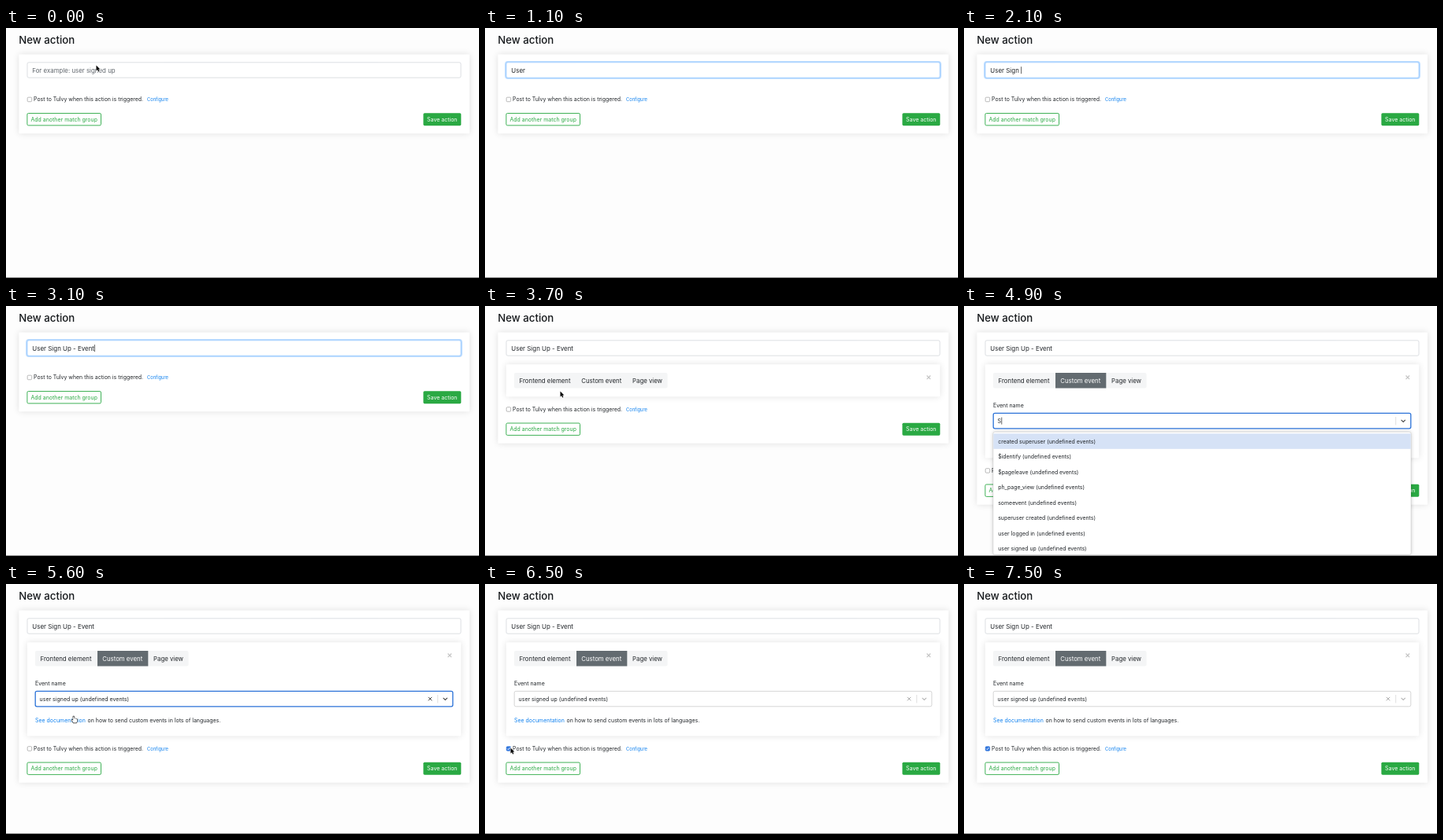
Animation of 600x318 px, one loop 7600 ms. Source, as an HTML page with a canvas:

```html
<!DOCTYPE html>
<html lang="en">
<head>
<meta charset="utf-8">
<title>New action</title>
<style>
html, body { margin: 0; width: 100%; height: 100%; overflow: hidden; background: #fdfdfd; }
canvas { display: block; width: 600px; height: 318px; }
</style>
</head>
<body>
<canvas id="stage"></canvas>
<script>
const W = 600, H = 318, LOOP = 7600, STEP = 100;
const INK = '#212529', GREY = '#62686e', GREEN = '#2aa943', LINK = '#0f80ef', BLUE = '#2b72d8';
const canvas = document.getElementById('stage');
const ctx = canvas.getContext('2d');
const dpr = window.devicePixelRatio || 1;
canvas.width = W * dpr;
canvas.height = H * dpr;

const EVENTS = ['created superuser', '$identify', '$pageleave', 'ph_page_view',
  'someevent', 'superuser created', 'user logged in', 'user signed up']
  .map(name => name + ' (undefined events)');
const CHOICE = EVENTS[7];

// Typing: time, number of letters shown
const TITLE = 'User Sign Up - Event';
const KEYS = [[0, 0], [800, 2], [900, 4], [1100, 5], [1200, 6], [1300, 7], [1700, 8], [1800, 9],
  [2100, 10], [2200, 11], [2300, 12], [2500, 14], [2700, 16], [2800, 17], [2900, 18],
  [3000, 19], [3100, 20]];

// Pointer: time, x, y, shape until the next point
const PATH = [
  [0, 114, 47, 'arrow'], [300, 78, 104, 'arrow'], [500, 30, 58, 'beam'], [900, 30, 58, ''],
  [3300, 32, 60, 'arrow'], [3500, 75, 114, 'hand'], [3700, 95, 108, 'arrow'],
  [3800, 148, 94, 'hand'], [4100, 144, 100, 'arrow'], [4300, 113, 138, 'arrow'],
  [4500, 100, 145, 'arrow'], [4900, 100, 145, ''],
  [5300, 104, 144, 'arrow'], [5600, 85, 168, 'hand'], [5700, 62, 186, 'arrow'],
  [5900, 31, 206, 'arrow'], [6500, 32, 208, 'arrow'], [6700, 50, 231, 'hand'],
  [6800, 84, 214, 'arrow'], [7200, 296, 94, 'arrow'], [7300, 222, 149, 'arrow'],
  [7400, 128, 110, 'arrow'], [7500, 128, 110, '']
];

function last(list, t) {
  let i = 0;
  while (i + 1 < list.length && list[i + 1][0] <= t) i++;
  return i;
}

function text(str, x, y, size = 7, color = INK, weight = 400, align = 'left') {
  ctx.font = `${weight} ${size}px Inter, sans-serif`;
  ctx.textAlign = align;
  ctx.fillStyle = color;
  ctx.fillText(str, x, y);
}

function box(x, y, w, h, r, fill, stroke, line = 0.6) {
  ctx.beginPath();
  ctx.roundRect(x, y, w, h, r);
  if (fill) { ctx.fillStyle = fill; ctx.fill(); }
  if (stroke) { ctx.strokeStyle = stroke; ctx.lineWidth = line; ctx.stroke(); }
}

function panel(x, y, w, h, r = 1, alpha = 0.12, blur = 8) {
  ctx.save();
  ctx.shadowColor = `rgba(0,0,0,${alpha})`;
  ctx.shadowBlur = blur * dpr;
  box(x, y, w, h, r, '#fff');
  ctx.restore();
}

function lines(points, color, width) {
  ctx.beginPath();
  points.forEach(([x, y, start]) => start ? ctx.moveTo(x, y) : ctx.lineTo(x, y));
  ctx.strokeStyle = color;
  ctx.lineWidth = width;
  ctx.stroke();
}

function cross(x, y, r, color, width) {
  lines([[x - r, y - r, 1], [x + r, y + r], [x + r, y - r, 1], [x - r, y + r]], color, width);
}

function caret(x, y) {
  ctx.fillStyle = '#222';
  ctx.fillRect(x, y, 0.7, 9);
}

function titleField(t) {
  const focus = t >= 3600 ? 0 : Math.min(1, Math.max(0, (t - 500) / 150));
  if (focus) box(26.1, 42.9, 551.8, 21.2, 3, null, `rgba(0,123,255,${0.28 * focus})`, 1.9);
  box(27, 43.8, 550, 19.4, 2, '#fff', focus ? '#80bdff' : '#c6cbd1');
  const count = KEYS[last(KEYS, t)][1];
  if (!count) {
    text('For example: user signed up', 33.3, 56.5, 7.88, GREY);
    return;
  }
  const typed = TITLE.slice(0, count);
  text(typed, 33.3, 56.5, 7.95);
  const dark = (t >= 1100 && t < 1200) || (t >= 1500 && t < 1700);
  if (focus && !dark) caret(33.6 + ctx.measureText(typed).width, 49.2);
}

function tabs(t) {
  box(37, 85, 194.5, 19.4, 2, '#f4f5f6');
  const chosen = t >= 3900, focus = chosen && t < 4600;
  if (chosen) {
    if (focus) box(115.4, 84.4, 65.4, 20.6, 1.5, null, 'rgba(108,117,125,.55)', 1.8);
    box(116, 85, 64.3, 19.4, 0, focus ? '#50575b' : '#636b70');
  }
  text('Frontend element', 43.6, 97.7, 7.85);
  text('Custom event', 122.2, 97.7, 7.82, chosen ? '#fff' : INK);
  text('Page view', 187, 97.7, 7.82);
}

function eventField(t) {
  const focus = t >= 4600 && t < 6100, picked = t >= 5100;
  text('Event name', 37, 129.2);
  box(37.2, 136.4, 529.6, 19.4, 2, '#fff', focus ? BLUE : '#c4c4c4', focus ? 1.3 : 0.7);
  lines([[547.7, 141, 1], [547.7, 151.4]], '#ccc', 0.6);
  lines([[554.6, 144.9, 1], [557.2, 147.5], [559.8, 144.9]], focus ? '#444' : '#b5b5b5', 1.1);

  if (picked) {
    text(CHOICE, 42.6, 148.7);
    cross(538, 146.1, 2.2, focus ? '#444' : '#aaa', 1);
  } else if (t >= 4900) {
    const typed = t < 5000 ? 'S' : 'Si';
    text(typed, 42.6, 148.7);
    caret(43 + ctx.measureText(typed).width, 141.6);
  } else {
    text('Select...', 42.6, 148.7, 7.1, '#707070');
    for (let i = 0; i < 3; i++) {
      const glow = 0.55 + 0.45 * Math.sin((t - 4300 - i * 160) / 1000 * 2 * Math.PI + 5.4 + i);
      ctx.fillStyle = `rgba(140,140,140,${Math.max(0.25, glow)})`;
      ctx.beginPath();
      ctx.arc(532 + i * 4.4, 146.2, 0.95, 0, 7);
      ctx.fill();
    }
  }
  text('See documentation', 37, 175.5, 6.98, LINK);
  text('on how to send custom events in lots of languages.', 103.5, 175.5, 6.98);
}

function menu(t) {
  if (t < 4600 || t >= 5100) return;
  const loading = t < 4900;
  const rows = loading ? ['Loading...'] : t < 5000 ? EVENTS : [CHOICE];
  const h = Math.min(156, rows.length * 19.55 + 4);
  panel(37, 160.2, 530, h, 2, 0.22, 5);
  box(37, 160.2, 530, h, 2, null, 'rgba(0,0,0,.16)', 0.6);
  ctx.save();
  ctx.beginPath();
  ctx.rect(37, 160, 530, h);
  ctx.clip();
  if (loading) {
    text('Loading...', 302, 174.5, 7, '#999', 400, 'center');
  } else {
    ctx.fillStyle = '#d6e2f6';
    ctx.fillRect(37.3, 162.3, 529.4, 19.5);
    rows.forEach((row, i) => text(row, 43.2, 174.5 + i * 19.55, 6.95));
  }
  ctx.restore();
}

function footer(y, checked) {
  box(27.2, y - 2.9, 5.5, 5.5, 1.2, checked ? '#2f74dc' : '#fff', checked ? '#2f74dc' : '#8c8c8c', 0.6);
  if (checked) lines([[28.4, y, 1], [29.5, y + 1.2], [31.4, y - 1.5]], '#fff', 0.9);
  text('Post to Tulvy when this action is triggered.', 35, y + 2.3, 6.95);
  text('Configure', 179, y + 2.3, 5.75, LINK);
  const b = y + 17.4;
  box(26.9, b, 93.6, 15.4, 1.6, '#fff', GREEN, 0.9);
  text('Add another match group', 73.7, b + 10.3, 7, GREEN, 400, 'center');
  box(529.4, b - 0.3, 47.9, 16, 1.6, GREEN);
  text('Save action', 553.3, b + 10.3, 7, '#fff', 400, 'center');
}

function shape(points, fill, edge) {
  ctx.beginPath();
  points.forEach(([x, y]) => ctx.lineTo(x, y));
  ctx.closePath();
  ctx.lineJoin = 'round';
  ctx.strokeStyle = edge;
  ctx.lineWidth = 1.2;
  ctx.stroke();
  ctx.fillStyle = fill;
  ctx.fill();
}

function pointer(t) {
  const i = last(PATH, t), [t0, x0, y0, kind] = PATH[i];
  if (!kind) return;
  const [t1, x1, y1] = PATH[i + 1];
  const k = (t - t0) / (t1 - t0);
  ctx.save();
  ctx.translate(x0 + (x1 - x0) * k, y0 + (y1 - y0) * k);
  if (kind === 'arrow') {
    shape([[0.5, 0.5], [0.5, 7.4], [2.1, 5.9], [3.2, 8.5], [4.4, 8], [3.3, 5.5], [5.4, 5.4]], '#000', '#fff');
  } else if (kind === 'hand') {
    shape([[0.2, 0.4], [1.3, 0.4], [1.6, 3], [4.6, 3.6], [5.4, 4.5], [4.9, 7.2], [4.3, 8.6],
      [0.6, 8.6], [-1.6, 5.4], [-1.2, 4.6], [0.2, 5.6]], '#fff', '#222');
  } else {
    lines([[-1.6, -4, 1], [0, -3.4], [1.6, -4], [0, -3.4, 1], [0, 3.4],
      [-1.6, 4, 1], [0, 3.4], [1.6, 4]], '#222', 0.7);
  }
  ctx.restore();
}

function draw(t) {
  ctx.setTransform(dpr, 0, 0, dpr, 0, 0);
  ctx.fillStyle = '#fdfdfd';
  ctx.fillRect(0, 0, W, H);
  text('New action', 16.2, 20.1, 13.25, '#16191c', 500);

  const shift = t < 3600 ? 0 : t < 3900 ? 40.5 : 118.5;
  panel(16.4, 33.5, 571.6, 100.7 + shift);
  titleField(t);
  if (shift) {
    panel(26.9, 74.2, 550.3, shift + 0.5);
    tabs(t);
    cross(562.8, 90.8, 2.3, '#c2c2c2', 1.1);
    if (t >= 3900) eventField(t);
  }
  footer(91.1 + shift, t >= 6100);
  menu(t);
  ctx.fillStyle = '#8b8b8b';
  ctx.fillRect(0, 317, W, 1);
  pointer(t);
}

const start = performance.now();
function tick() {
  const t = (performance.now() - start) % LOOP;
  draw(Math.floor(t / STEP) * STEP);
  requestAnimationFrame(tick);
}
tick();
</script>
</body>
</html>
```
